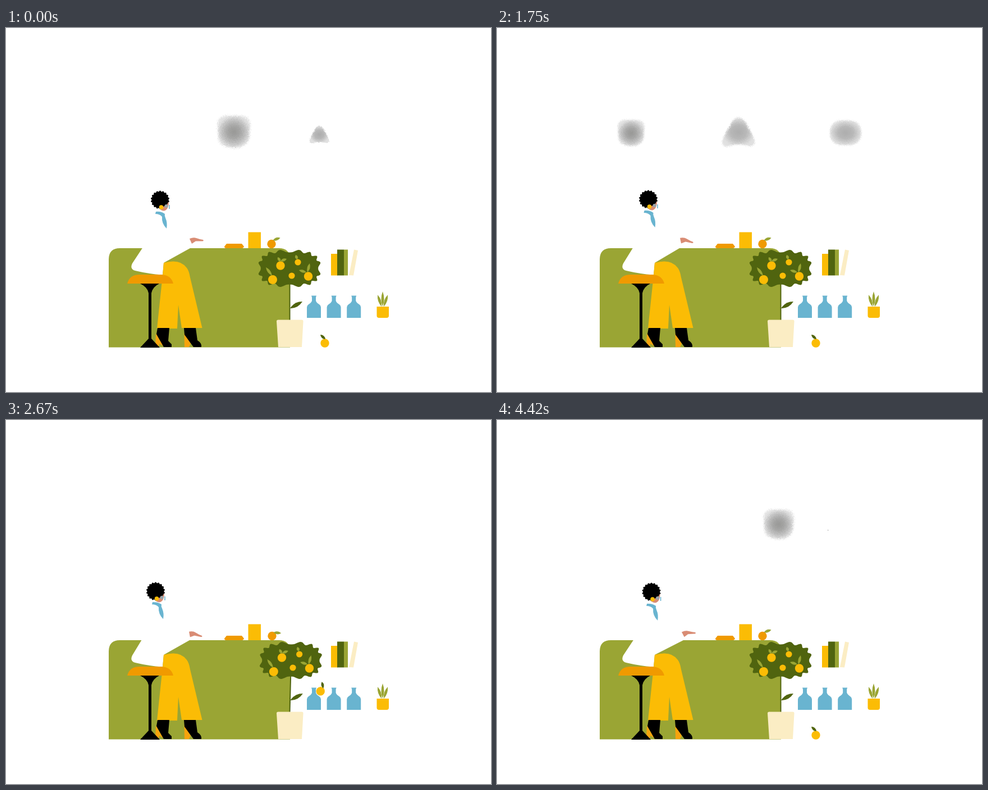
Write an HTML page that moves like this. It is 864 px wide and 648 px high and loops after 4.51 s.

```html
<!DOCTYPE html>
<html lang="en">
<head>
<meta charset="utf-8">
<title>At the counter</title>
<style>
  html, body { margin: 0; width: 100%; height: 100%; overflow: hidden; background: #fff; }
  svg { display: block; width: 864px; height: 648px; }
  .green { fill: #9aa534; }
  .dark { fill: #50640f; }
  .yellow { fill: #fbbc05; }
  .orange { fill: #f09a00; }
  .blue { fill: #69b4d0; }
  .cream { fill: #fbedc4; }
  .skin { fill: #d98c74; }
</style>
</head>
<body>
<svg viewBox="0 0 864 648">
  <defs>
    <radialGradient id="smoke">
      <stop offset="0" stop-color="#979795"/>
      <stop offset=".4" stop-color="#a6a6a5"/>
      <stop offset=".75" stop-color="#c3c3c3"/>
      <stop offset="1" stop-color="#e2e2e2"/>
    </radialGradient>
    <radialGradient id="mist">
      <stop offset="0" stop-color="#adadad"/>
      <stop offset=".5" stop-color="#b8b8b8"/>
      <stop offset="1" stop-color="#e0e0e0"/>
    </radialGradient>
    <filter id="grain" x="-20%" y="-20%" width="140%" height="140%" color-interpolation-filters="sRGB">
      <feGaussianBlur stdDeviation="1.3" result="soft"/>
      <feTurbulence type="fractalNoise" baseFrequency=".7" numOctaves="2" seed="4"/>
      <feDisplacementMap in="soft" scale="7" xChannelSelector="R" yChannelSelector="G"/>
    </filter>
    <path id="bottle" class="blue" d="M544 476.5h9l-1 3v6Q553 489 558 492 561 494 561 497V516H536V497Q536 494 539 492 544 489 545 485.5v-6Z"/>
  </defs>

  <path id="blob0" fill="url(#smoke)" filter="url(#grain)" d="M-24-10Q-24-23-8-23H10Q24-22 24-8 22 4 23 8 20 23 2 24-22 24-23 8Z"/>
  <path id="blob1" fill="url(#mist)" filter="url(#grain)" d="M0-27Q10-27 17-10 30 10 29 18 26 26 16 23 0 18-14 23-28 28-29 16-28 8-16-10-10-27 0-27Z"/>
  <rect id="blob2" fill="url(#mist)" filter="url(#grain)" x="-28" y="-22" width="56" height="44" rx="20"/>

  <path class="green" d="M183 568.5V412q0-20 20-20H486q20 0 20 20V568.5Z"/>
  <path class="orange" d="M389 389l4-5h27l4 5q-1 3-3 3h-29q-3 0-3-3Z"/>
  <rect class="yellow" x="431.5" y="363.5" width="22.5" height="28.5"/>
  <g id="snack"><circle class="orange" cx="473" cy="384.5" r="7.7"/></g>

  <path id="shirt" fill="#fff"/>
  <path id="hand" class="skin" d="M327 375q7-3 12-1 7 2.5 12 3 2 2-1 2.500h-12l-7 4.500Z"/>

  <path class="yellow" d="M281 418Q310 410 322 427q4 5 6 17l21.5 90H313l-6-41-2 42H269l10-95Z"/>
  <g fill="#f6a30d">
    <path d="M267 544l13 22-7-4-1 6h-6Z"/>
    <path d="M317.5 543L329 562l-3 6h-8Z"/>
  </g>
  <path d="M270 534h21l-2 23 6 6v5h-14l-13-23Z"/>
  <path d="M317 534h21l3 22q8 5 7 12h-14l-16-22Z"/>
  <path d="M239 455h34q-12 6-14 17v81l15 16h-35l15-16v-81q-2-11-15-17Z"/>
  <path class="orange" d="M216 455q4-16 22-16h37q19 0 23 16Z"/>

  <path id="scarf" class="blue" d="M267 327q9-1 16 4-1 3 1 7 4 9 2 19-9-9-8-21-4-5-12-5Z"/>
  <g id="head">
    <path id="hair"/>
    <path class="skin" d="M290 309q0 15-9 16.5-8-.5-8-7.500h7q7-2 10-9Z"/>
    <circle cx="285.5" cy="317" r="3" fill="#9aa5ab"/>
    <path d="M291 315v7" stroke="#69b4d0" stroke-width="1.6"/>
    <circle class="yellow" cx="276.5" cy="319" r="3.8"/>
  </g>

  <g id="tree">
    <path d="M505.5 450v71" stroke="#50640f" stroke-width="2"/>
    <path id="crown" class="dark"/>
    <circle class="yellow" cx="489" cy="423" r="7.7"/>
    <circle class="yellow" cx="520" cy="417" r="5.6"/>
    <circle class="yellow" cx="509" cy="441" r="5.6"/>
    <circle class="yellow" cx="538.5" cy="442" r="7.7"/>
    <circle class="yellow" cx="475" cy="448" r="8"/>
  </g>
  <path class="cream" d="M482 522q0-2.500 3-2.500h42q3 0 2.500 3.500L527 568H485Z"/>

  <rect class="yellow" x="579" y="402" width="12" height="38.5"/>
  <rect class="dark" x="590" y="394.5" width="12" height="46"/>
  <rect class="green" x="602" y="394.5" width="7" height="46"/>
  <path class="cream" d="M620 394.5l7 1.500-8 44.500-8-.5Z"/>
  <use href="#bottle"/><use href="#bottle" x="35.6"/><use href="#bottle" x="71.2"/>
  <g id="plant"><path class="yellow" d="M660.5 496H682v16q0 4-4 4h-13.500q-4 0-4-4Z"/></g>
  <g id="fruit"><circle class="yellow" r="7.7"/></g>
</svg>
<script>
const $ = id => document.getElementById(id);
const LOOP = 4510, STEP = 83.4;

// Pointed leaf from (x, y) along (dx, dy), bulging w to each side
function leaf(parent, tone, x, y, dx, dy, w = 5) {
  const n = w / Math.hypot(dx, dy), mx = x + dx / 2, my = y + dy / 2;
  const el = document.createElementNS("http://www.w3.org/2000/svg", "path");
  el.setAttribute("class", tone);
  el.setAttribute("d", `M${x} ${y}Q${mx - dy * n} ${my + dx * n} ${x + dx} ${y + dy}Q${mx + dy * n} ${my - dx * n} ${x} ${y}Z`);
  $(parent).append(el);
  return el;
}

// Closed wavy outline; power below 1 squares off the ellipse
function wavy(cx, cy, rx, ry, lobes, amp, power) {
  const bend = v => Math.sign(v) * Math.abs(v) ** power;
  let d = "";
  for (let i = 0; i < 240; i++) {
    const a = i * Math.PI / 120, wave = amp * Math.cos(lobes * a);
    const x = cx + (rx - wave) * bend(Math.cos(a)), y = cy + (ry - wave) * bend(Math.sin(a));
    d += `${i ? "L" : "M"}${x.toFixed(2)} ${y.toFixed(2)}`;
  }
  return d + "Z";
}

$("hair").setAttribute("d", wavy(274.5, 306, 15.8, 15.6, 18, .9, 1));
$("crown").setAttribute("d", wavy(505, 428, 53.5, 31, 16, 2.4, .72));

leaf("tree", "green", 489, 416, -5, -8);
leaf("tree", "green", 489, 415, 11, -4);
leaf("tree", "green", 519, 412, -3, -8);
leaf("tree", "green", 537, 435, 4, -16);
leaf("tree", "green", 535, 435, -13, -4);
leaf("tree", "green", 474, 441, -11, -15);
leaf("tree", "dark", 506, 499, 22, -12, 7);
leaf("plant", "green", 671, 496, 0, -27);
for (const side of [-1, 1]) leaf("plant", "green", 671 + 2 * side, 496, 7 * side, -21);
leaf("fruit", "dark", 1, -7, -9, -8);
const snackLeaf = leaf("snack", "green", 475.5, 378, 13, -4.5);

// Tracks hold [time, values...]; times before the loop point are negative.
// Clouds: x, scale
const square = [[-340, 650, 0], [-90, 500, 1.14], [0, 406, 1.22], [250, 242, 1], [350, 237, 1],
  [500, 257, 1], [750, 238, 1], [1750, 239, 1], [1920, 205, 0]];
const peak = [[-100, 592, 0], [0, 558, .6], [320, 428, 1], [500, 440, 1], [700, 430, 1],
  [1750, 430, 1], [2000, 294, .8], [2160, 225, 0]];
const oval = [[80, 668, 0], [330, 617, 1], [500, 621, 1], [1750, 621, 1], [2000, 510, 1.3], [2400, 230, 0]];
// Lean: head x, scarf x
const lean = [[-410, 2.5, .5], [0, 0, 0], [500, -1, -3.5], [1750, -5, -4.5], [2670, -8, -6], [3830, 4.5, .5], [4100, 2.5, .5]];
const swing = [[2330, 0], [2670, 1], [3000, -.5], [3300, .3], [3580, 0]];

// Hand poses: dx, dy, turn, cuff x; one letter for each sixth of a second
const poses = { F: [0, 0, 0, 328], U: [-1, -1, 12, 325], D: [2, 4, 10, 334], M: [-1, 2, 13, 327], L: [4, 5, -8, 336] };
const typing = "FUDUDUDUDDUUDUDUMUDUDUDUDUL";

const mix = (a, b, u) => a.map((v, i) => v + (b[i] - v) * u);

function sample(track, t) {
  const i = track.findIndex(k => k[0] > t);
  if (i < 1) return (i ? track.at(-1) : track[0]).slice(1);
  const a = track[i - 1], b = track[i];
  return mix(a, b, (t - a[0]) / (b[0] - a[0])).slice(1);
}

function handPose(t) {
  const beat = t * 6 / 1000, i = Math.floor(beat + 1e-6);
  const at = n => poses[typing[n % typing.length]];
  return mix(at(i), at(i + 1), beat - i);
}

function hop(t, from, to, height) {
  const u = (t - from) / (to - from);
  return Math.max(0, 4 * u * (1 - u) * height);
}

const move = (id, value) => $(id).setAttribute("transform", value);

function draw(now) {
  // Poses are held for a twelfth of a second
  const held = Math.floor((now % LOOP + 7) / STEP) * 250 / 3 % 4500;
  const t = held > 4100 ? held - LOOP : held;

  [square, peak, oval].forEach((track, i) => {
    const [x, s] = sample(track, t);
    $("blob" + i).style.display = s > .02 ? "" : "none";
    move("blob" + i, `translate(${x} ${196.5 - 10 * s}) scale(${s})`);
  });

  const [headX, scarfX] = sample(lean, t);
  move("head", `translate(${headX} ${Math.max(-1, scarfX * .3)})`);
  move("scarf", `translate(${scarfX} ${scarfX * .45})`);

  const [x, y, turn, cuff] = handPose(held);
  move("hand", `translate(${x} ${y}) rotate(${turn} 328 375)`);
  $("shirt").setAttribute("d", `M${243.5 + scarfX / 4} 391L225 419q-5 10 5 13 25 6 49 7.5l2-21.5L${cuff} 392v-1Z`);

  const [sway] = sample(swing, t);
  move("tree", `translate(0 519) skewX(${-1.5 * sway}) translate(0 -519)`);
  move("snack", `translate(${sway} 0)`);
  snackLeaf.setAttribute("transform", `rotate(${25 * sway} 475 378)`);

  const h = hop(t, 2420, 3000, 80) + hop(t, 3000, 3400, 25) + hop(t, 3400, 3640, 6);
  move("fruit", `translate(${568 - h / 10} ${561 - h}) rotate(${h * .47})`);
}

const start = performance.now();
(function tick() {
  draw(performance.now() - start);
  requestAnimationFrame(tick);
})();
</script>
</body>
</html>
```
